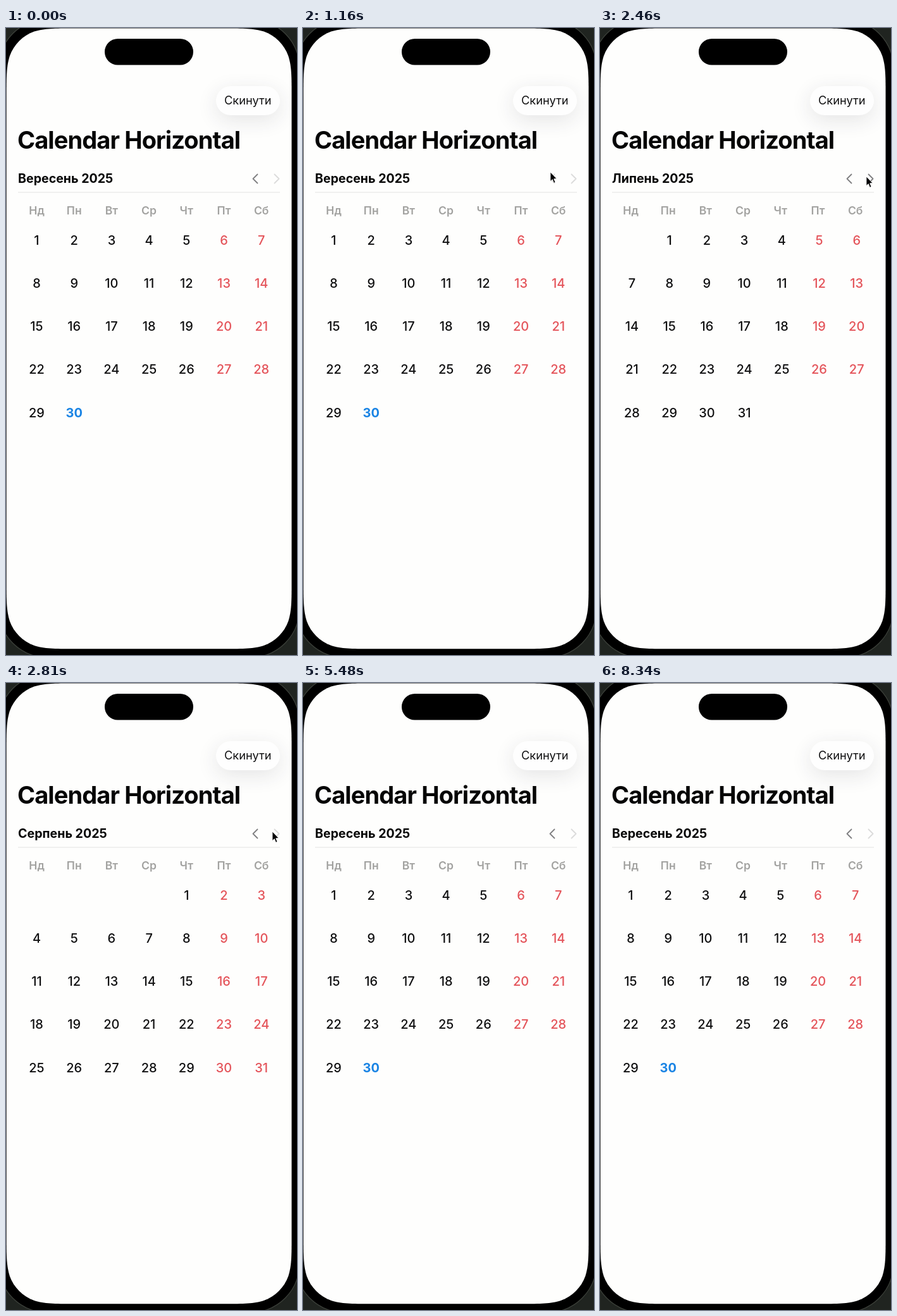
Write an HTML page that moves like this. It is 460 px wide and 992 px high and loops after 8390 ms.

```html
<!DOCTYPE html>
<html lang="uk">
<head>
<meta charset="utf-8">
<title>Calendar Horizontal</title>
<style>
  html, body { margin: 0; width: 100%; height: 100%; overflow: hidden; background: #202420; }
  svg { display: block; width: 460px; height: 992px; }
  text { font-family: Inter, Roboto, "Noto Sans", sans-serif; font-optical-sizing: none; fill: #111112; }
  .title { font-size: 38px; font-weight: 700; letter-spacing: -0.9px; fill: #050505; }
  .month { font-size: 19.6px; font-weight: 700; fill: #050505; }
  .button { font-size: 18.3px; }
  .mid { text-anchor: middle; }
  .week { font-size: 17.6px; font-weight: 600; fill: #a2a2a0; }
  .day { font-size: 20px; font-weight: 450; }
  .rest { fill: #e4545a; }
  .today { fill: #1a84e4; font-weight: 700; }
  .chevron { fill: none; stroke: #808082; stroke-width: 1.8; stroke-linecap: round; stroke-linejoin: round; }
</style>
</head>
<body>
<svg viewBox="0 0 460 992">
  <defs>
    <clipPath id="screen"><path id="clip"/></clipPath>
    <filter id="soft" x="-60%" y="-120%" width="220%" height="340%"><feGaussianBlur stdDeviation="16"/></filter>
  </defs>
  <path id="body" fill="#000" stroke="#3c403a" stroke-width="1.2"/>
  <path id="glass" fill="#fefefd"/>
  <g clip-path="url(#screen)">
    <rect x="332" y="100" width="101" height="46" rx="23" fill="#303040" opacity=".12" filter="url(#soft)"/>
    <rect x="332" y="92" width="101" height="46" rx="23" fill="#fefefe"/>
    <text class="button mid" x="382.3" y="121.3">Скинути</text>
    <text class="title" x="18" y="190.5">Calendar Horizontal</text>
    <text class="month" id="month" x="19" y="245.3"></text>
    <path class="chevron" id="prev" d="M397.5 231.5L390.5 238.5L397.5 245.5"/>
    <path class="chevron" id="next" d="M424.5 231.5L431.5 238.5L424.5 245.5"/>
    <path d="M19 260H433" stroke="#e4e4e2" stroke-width="1.2"/>
    <g id="week"></g>
    <g id="track"></g>
    <path id="cursor" d="M0 0V14.5L3.3 11.6L5.6 17.3L8 16.3L5.7 10.8L10 10.4Z" fill="#000" stroke="#fff" stroke-width=".8" stroke-linejoin="round"/>
  </g>
  <rect x="156" y="17" width="140" height="41.5" rx="20.7" fill="#000"/>
</svg>
<script>
const LOOP = 8390, PAGE = 451, COL = 59.2, ROW = 68.2;
const $ = id => document.getElementById(id);

// Rectangle with continuous-curvature corners
function smoothRect(x, y, w, h, r) {
  const bend = [[0, 1.529], [0, 1.088], [0, .868], [.075, .631], [.169, .373],
    [.373, .169], [.631, .075], [.868, 0], [1.088, 0], [1.529, 0]];
  const corner = (cx, cy, sx, sy) => {
    const pts = bend.map(([a, b]) => `${cx + sx * a * r} ${cy + sy * b * r}`);
    if (sx !== sy) pts.reverse();
    return pts[0] + 'C' + pts.slice(1).join(' ');
  };
  return 'M' + [corner(x, y, 1, 1), corner(x + w, y, -1, 1),
    corner(x + w, y + h, -1, -1), corner(x, y + h, 1, -1)].join('L') + 'Z';
}

const face = smoothRect(.7, .4, 450.8, 981.8, 69.4);
$('clip').setAttribute('d', face);
$('glass').setAttribute('d', face);
$('body').setAttribute('d', smoothRect(-14, -16, 480, 1014, 85));

const months = [
  { name: 'Червень', start: 6, days: 30 },
  { name: 'Липень', start: 1, days: 31 },
  { name: 'Серпень', start: 4, days: 31 },
  { name: 'Вересень', start: 0, days: 30, today: 30 }
];

// [time, page]
const pages = [[0, 3], [1180, 3], [1390, 2], [1420, 2], [1630, 1], [1660, 1], [1870, 0],
  [2240, 0], [2470, 1], [2510, 1], [2760, 2], [2830, 2], [3080, 3]];
// [time, x, y]
const moves = [[150, 470, 420], [900, 391, 228], [1300, 391, 228], [1860, 392.5, 231.5],
  [1950, 392.5, 231.5], [2180, 421, 235], [3110, 421, 235], [3450, 472, 330]];
// [start, end, button]
const presses = [[1090, 1200, 'prev'], [1400, 1470, 'prev'], [1640, 1710, 'prev'],
  [2210, 2290, 'next'], [2490, 2560, 'next'], [2790, 2870, 'next']];

function addText(parent, cls, x, y, value) {
  const el = document.createElementNS('http://www.w3.org/2000/svg', 'text');
  el.setAttribute('class', cls);
  el.setAttribute('x', x);
  el.setAttribute('y', y);
  el.textContent = value;
  parent.append(el);
}

['Нд', 'Пн', 'Вт', 'Ср', 'Чт', 'Пт', 'Сб'].forEach((name, i) =>
  addText($('week'), 'week mid', 48.5 + i * COL, 295.2, name));

months.forEach((m, page) => {
  for (let d = 1; d <= m.days; d++) {
    const cell = m.start + d - 1, col = cell % 7, row = Math.floor(cell / 7);
    const kind = d === m.today ? ' today' : col > 4 ? ' rest' : '';
    addText($('track'), 'day mid' + kind, page * PAGE + 48.5 + col * COL, 342.7 + row * ROW, d);
  }
});

const ease = p => p * p * (3 - 2 * p);

function valueAt(steps, t, k = 1) {
  const i = steps.findIndex(s => s[0] > t);
  if (i === 0) return steps[0][k];
  if (i < 0) return steps[steps.length - 1][k];
  const a = steps[i - 1], b = steps[i];
  return a[k] + (b[k] - a[k]) * ease((t - a[0]) / (b[0] - a[0]));
}

function draw(now) {
  const t = now % LOOP;
  const page = valueAt(pages, t), shown = Math.round(page);
  const pressed = presses.find(p => t >= p[0] && t < p[1])?.[2];
  const dim = (id, off) => $(id).setAttribute('opacity', off || pressed === id ? 0.28 : 1);

  $('track').setAttribute('transform', `translate(${-page * PAGE} 0)`);
  const label = months[shown].name + ' 2025';
  if ($('month').textContent !== label) $('month').textContent = label;
  dim('prev', shown === 0);
  dim('next', shown === 3);
  $('cursor').setAttribute('transform', `translate(${valueAt(moves, t, 1)} ${valueAt(moves, t, 2)})`);
}

const begin = performance.now();
function tick() {
  draw(performance.now() - begin);
  requestAnimationFrame(tick);
}
tick();
</script>
</body>
</html>
```
